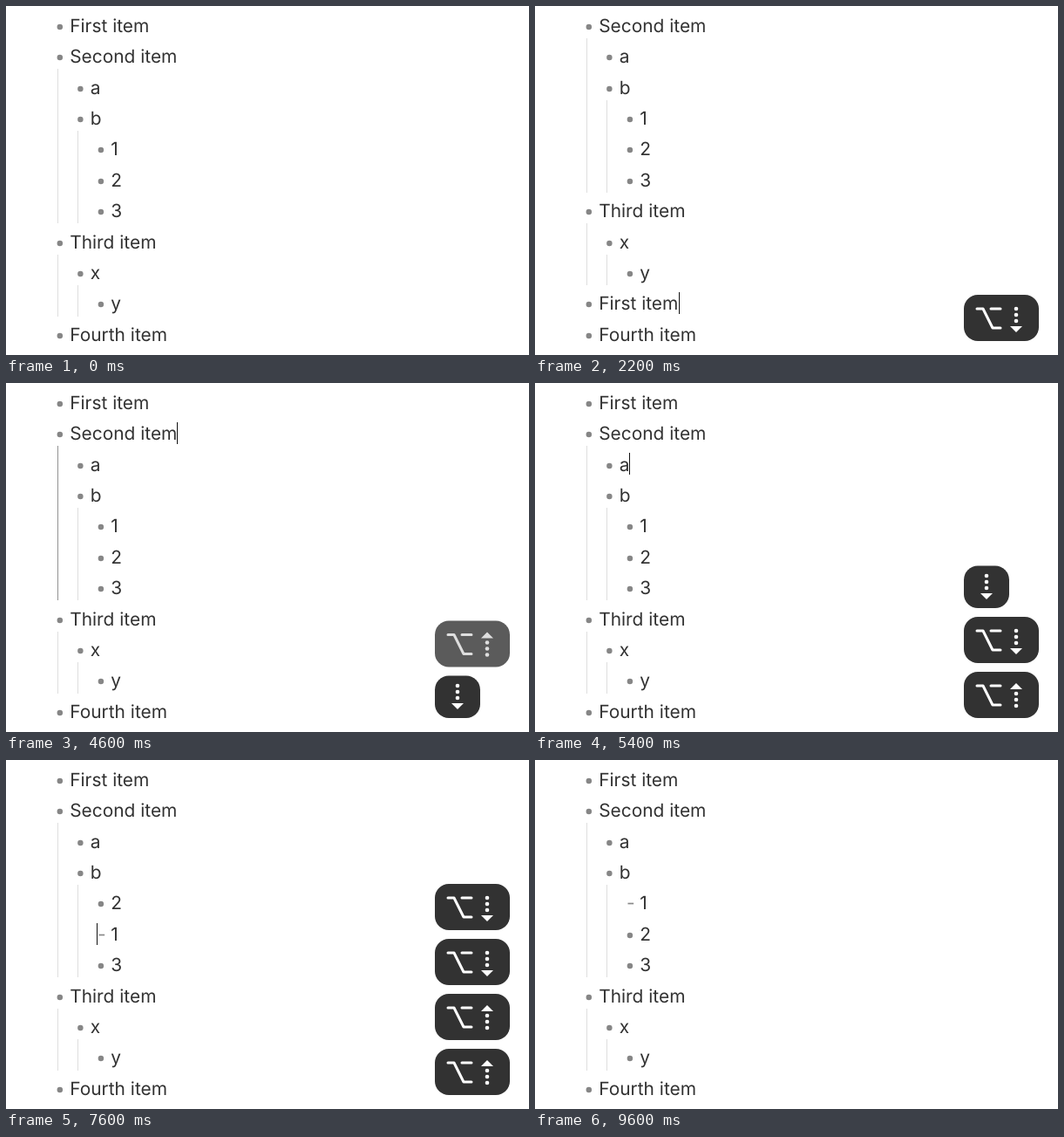
An HTML page that plays this animation: 600 by 400 pixels, repeating every 9.8 s.

```html
<!DOCTYPE html>
<html lang="en">
<head>
<meta charset="utf-8">
<title>Moving list items</title>
<style>
  html, body { margin: 0; width: 100%; height: 100%; overflow: hidden; background: #fff; }
  svg { display: block; }
  text {
    font: 20.9px Inter, "Open Sans", sans-serif;
    font-optical-sizing: none;
    text-rendering: geometricPrecision;
    white-space: pre;
  }
</style>
</head>
<body>
<svg id="stage" width="600" height="400" viewBox="0 0 600 400"></svg>
<script>
const LOOP = 9800, STEP = 200, BLINK = 600;
const ROW = 35.4, INDENT = 23.55;
const LAG = 20;                          // the list reacts just after the key shows
const FADE_START = 780, FADE_END = 980;  // age of a key cap in ms

// Option + arrow moves an item among its siblings; a bare arrow moves the caret.
const presses = [
  [1180, 'option down'], [1610, 'option down'], [2580, 'option down'],
  [2966, 'option up'], [3380, 'option up'], [3780, 'option up'],
  [4380, 'down'], [4780, 'down'],
  [4980, 'option down'], [5360, 'option up'],
  [5610, 'down'], [6580, 'down'],
  [6980, 'option down'], [7020, 'option down'],
  [7450, 'option up'], [7590, 'option up'],
].map(([at, keys]) => ({ at, option: keys.startsWith('option'), up: keys.endsWith('up') }));

const item = (label, caretX, children = []) => ({ label, caretX, children });

const makeList = () => [
  item('First item', 165),
  item('Second item', 196, [
    item('a', 108),
    item('b', 109, [item('1', 104), item('2'), item('3')]),
  ]),
  item('Third item', 172, [item('x', 108, [item('y', 132)])]),
  item('Fourth item', 186),
];

const flatten = (items, level = 0) => items.flatMap(node =>
  [{ node, level, siblings: items }, ...flatten(node.children, level + 1)]);

const countRows = node => flatten(node.children).length;

const rect = (x, y, w, h, fill, extra = '') =>
  `<rect x="${x}" y="${y}" width="${w}" height="${h}" fill="${fill}" ${extra}/>`;

const circle = (x, y, r, fill) => `<circle cx="${x}" cy="${y}" r="${r}" fill="${fill}"/>`;

const text = (x, y, label, fill) => `<text x="${x}" y="${y}" fill="${fill}">${label}</text>`;

function replay(time) {
  const list = makeList();
  let cursor = list[0], lastPress = -BLINK;
  for (const { at, option, up } of presses) {
    if (at + LAG > time) break;
    lastPress = Math.ceil((at + LAG) / STEP) * STEP;
    const rows = flatten(list);
    const index = rows.findIndex(row => row.node === cursor);
    if (option) {
      const { siblings } = rows[index];
      const from = siblings.indexOf(cursor);
      siblings.splice(from, 1);
      siblings.splice(from + (up ? -1 : 1), 0, cursor);
    } else {
      cursor = rows[index + 1].node;
    }
  }
  const caretOn = Math.floor((time - lastPress) / BLINK) % 2 === 0;
  return { list, cursor, caretOn };
}

function drawRow({ node, level }, index, cursor, caretOn) {
  const shift = level * INDENT, y = index * ROW;
  const textX = 73.2 + shift, baseline = Math.round(29.8 + y);
  const selected = node === cursor;
  const showsDash = selected && node.caretX < textX;
  let out = showsDash
    ? text(105, baseline, '-', '#888')
    : circle(61.8 + shift, baseline - 6.1, 3.25, '#868686');
  out += text(textX, baseline, node.label, '#323232');

  const childRows = countRows(node);
  if (childRows) {
    const top = Math.round(1.5 + y + ROW), bottom = Math.round(1.5 + y + ROW * (childRows + 1));
    out += rect(Math.floor(59 + shift), top, 1, bottom - top, selected ? '#929292' : '#dedede');
  }
  if (selected && caretOn) out += rect(node.caretX, Math.floor(10 + y), 1, 25, '#111');
  return out;
}

function drawArrow(x, bottom, up) {
  const dots = (up ? [28, 21, 14] : [37, 30, 23]).map(d => circle(x, bottom - d, 2.3, '#fff')).join('');
  const base = bottom - (up ? 33 : 17), tip = bottom - (up ? 40 : 10);
  return dots + `<path d="M${x - 7} ${base}H${x + 7}L${x} ${tip}Z" fill="#fff"/>`;
}

function drawKeys({ option, up }, bottom, height, alpha) {
  const cap = rect(492, bottom - height, option ? 86 : 52, height, '#323232', `rx="16" opacity="${alpha}"`);
  const symbol = option
    ? `<path d="M507 ${bottom - 37}h7l11 22h9M523 ${bottom - 37}h11" fill="none" stroke="#fff"
        stroke-width="3" stroke-linejoin="round" stroke-linecap="round"/>`
    : '';
  return cap + `<g opacity="${alpha}">${symbol}${drawArrow(option ? 552 : 518, bottom, up)}</g>`;
}

function drawKeyStack(time) {
  let bottom = 384, out = '';
  for (const press of [...presses].reverse()) {
    const age = time - press.at;
    if (age < 0 || age >= FADE_END) continue;
    const alpha = Math.min(1, (FADE_END - age) / (FADE_END - FADE_START));
    const height = press.option ? 53 : 48.5;
    out += drawKeys(press, bottom, height, alpha);
    bottom -= height + 10;
  }
  return out;
}

const stage = document.getElementById('stage');
let shown = -1;

function render(now) {
  const time = Math.floor((now % LOOP) / STEP) * STEP;
  if (time !== shown) {
    shown = time;
    const { list, cursor, caretOn } = replay(time);
    stage.innerHTML = flatten(list).map((row, i) => drawRow(row, i, cursor, caretOn)).join('')
      + drawKeyStack(time);
  }
}

const start = performance.now();
function tick() {
  render(performance.now() - start);
  requestAnimationFrame(tick);
}
tick();
</script>
</body>
</html>
```
